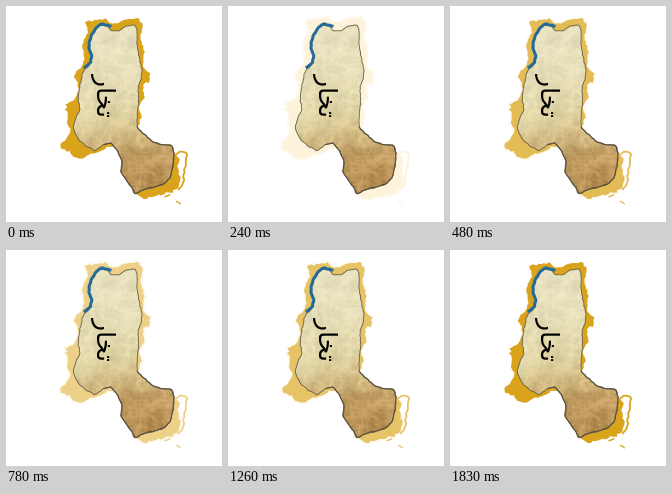
Recreate the animation shown at these times as a matplotlib script. Size 216x216 px, loop 1860 ms.

```python
import numpy as np
import matplotlib.pyplot as plt
from matplotlib.animation import FuncAnimation
from matplotlib.patches import Polygon

SIZE, DPI = 216, 100
FRAMES, STEP = 62, 30
PX = 72 / DPI
GOLD = np.array([217, 164, 28]) / 255
CREAM = np.array([254, 247, 228]) / 255
rng = np.random.default_rng(7)

LAND = [(88, 24), (93, 19), (101, 20), (105, 25), (113, 25), (121, 20),
        (129, 19), (131, 24), (131, 40), (134, 55), (136, 66), (135, 73),
        (132, 80), (133, 95), (131, 108), (131, 121), (138, 128), (147, 136),
        (158, 139), (166, 139), (168, 148), (167, 160), (164, 172),
        (158, 178), (148, 181), (137, 184), (129, 188), (126, 182),
        (120, 174), (115, 166), (116, 155), (111, 144), (105, 137),
        (97, 139), (89, 145), (80, 140), (72, 133), (67, 123), (70, 112),
        (74, 104), (72, 95), (74, 80), (77, 65), (84, 58), (86, 50),
        (83, 42), (84, 33)]
RIVER = [(104, 20), (95, 18), (90, 22), (86, 29), (83, 36), (83, 43),
         (86, 50), (84, 57), (78, 62)]
GLOW = [(79, 16), (90, 14), (101, 13), (106, 18), (114, 17), (120, 13),
        (133, 13), (137, 20), (134, 30), (138, 45), (137, 62), (145, 67),
        (144, 75), (137, 78), (138, 92), (134, 100), (135, 110), (132, 122),
        (126, 130), (112, 140), (102, 141), (94, 146), (84, 148), (76, 152),
        (66, 150), (64, 146), (55, 143), (55, 138), (62, 132), (64, 126),
        (61, 118), (62, 110), (60, 98), (69, 93), (73, 85), (71, 76),
        (67, 70), (71, 65), (77, 58), (78, 48), (76, 40), (80, 31), (82, 23)]
SKIRT = [(128, 184), (145, 178), (160, 174), (166, 160), (168, 149),
         (173, 152), (172, 164), (175, 172), (173, 180), (165, 187),
         (157, 188), (148, 191), (138, 193), (131, 190)]
LOOP = [(168, 151), (173, 146), (181, 147), (180, 158), (177, 170),
        (178, 177), (172, 185)]


def roughen(points, amount, gap=2.5, closed=True):
    """Split a path into short pieces and shake them."""
    pts = np.array(points + points[:1] if closed else points, float)
    along = np.r_[0, np.cumsum(np.hypot(*np.diff(pts, axis=0).T))]
    s = np.arange(0, along[-1], gap)
    path = np.c_[np.interp(s, along, pts[:, 0]), np.interp(s, along, pts[:, 1])]
    return path + rng.normal(0, amount, path.shape)


def noise(cell):
    """Smooth value noise over the stage."""
    n = SIZE // cell + 2
    grid = rng.random((n, n))
    t = np.arange(SIZE) / cell
    i = t.astype(int)
    f = t - i
    f = f * f * (3 - 2 * f)
    fx, fy = f[None, :], f[:, None]
    rows = grid[i] * (1 - fy) + grid[i + 1] * fy
    return rows[:, i] * (1 - fx) + rows[:, i + 1] * fx


def terrain():
    y, x = np.mgrid[:SIZE, :SIZE]
    stops = [10, 70, 112, 135, 155, 190]
    tones = np.array([(234, 227, 194), (231, 223, 185), (222, 210, 162),
                      (209, 184, 128), (190, 152, 94), (184, 144, 84)])
    height = y + 0.16 * (x - 100) + 10 * (noise(14) - 0.5)
    rgb = np.stack([np.interp(height, stops, c) for c in tones.T], -1)
    veins = sum(w * (1 - np.abs(2 * noise(c) - 1))
                for c, w in ((18, 0.4), (9, 0.35), (4, 0.25)))
    depth = np.interp(height, [20, 120, 150], [26, 40, 75])
    shade = (veins - 0.66) * depth + (noise(2) - 0.5) * 8
    return np.clip(rgb + shade[..., None], 0, 255) / 255


def fade(ms):
    """0 is full gold, 1 is pale cream."""
    return np.interp(ms, [0, 240, 540, 840, 1830], [0, 0.95, 0.12, 0.65, 0])


fig = plt.figure(figsize=(SIZE / DPI, SIZE / DPI), dpi=DPI, facecolor="white")
ax = fig.add_axes([0, 0, 1, 1])
ax.set(xlim=(0, SIZE), ylim=(SIZE, 0))
ax.axis("off")

edge, skirt = roughen(GLOW, 0.7), roughen(SKIRT, 0.8)
halo = [ax.add_patch(Polygon(p, fc=CREAM, ec=CREAM, lw=4 * PX, alpha=0))
        for p in (edge, skirt)]
fills = [ax.add_patch(Polygon(p, lw=0, zorder=2)) for p in (edge, skirt)]
strokes = [ax.plot(*roughen(p, 0.4, closed=False).T, lw=w * PX, zorder=2)[0]
           for p, w in ((LOOP, 1.8),
                        ([(159, 191), (165, 189)], 1.5),
                        ([(171, 195), (175, 199)], 1.3))]

shore = roughen(LAND, 0.3)
land = ax.add_patch(Polygon(shore, fc="none", ec="#6b6249", lw=0.9 * PX, zorder=4))
ax.imshow(terrain(), extent=(0, SIZE, SIZE, 0), zorder=3,
          aspect="auto").set_clip_path(land)
south = roughen(LAND[15:34], 0.3, closed=False)
ax.plot(*south.T, color="#57503f", lw=1.1 * PX, zorder=4)
river = roughen(RIVER, 0.3, closed=False)
ax.plot(*river.T, color="#246a98", lw=3 * PX, zorder=5)

# Joined letter forms in visual order
ax.text(98, 88, "\ufead\ufe8e\ufea8\ufe97", rotation=-90, ha="center",
        va="center", family="DejaVu Sans", size=25 * PX, color="black", zorder=6)


def draw(i):
    k = fade(i * STEP)
    color = GOLD + (CREAM - GOLD) * k
    for h in halo:
        h.set_alpha(k)
    for f in fills:
        f.set_facecolor(color)
    for s in strokes:
        s.set_color(color)
    return halo + fills + strokes


anim = FuncAnimation(fig, draw, frames=FRAMES, interval=STEP, repeat=True,
                     repeat_delay=0, blit=False)
plt.show()
```
